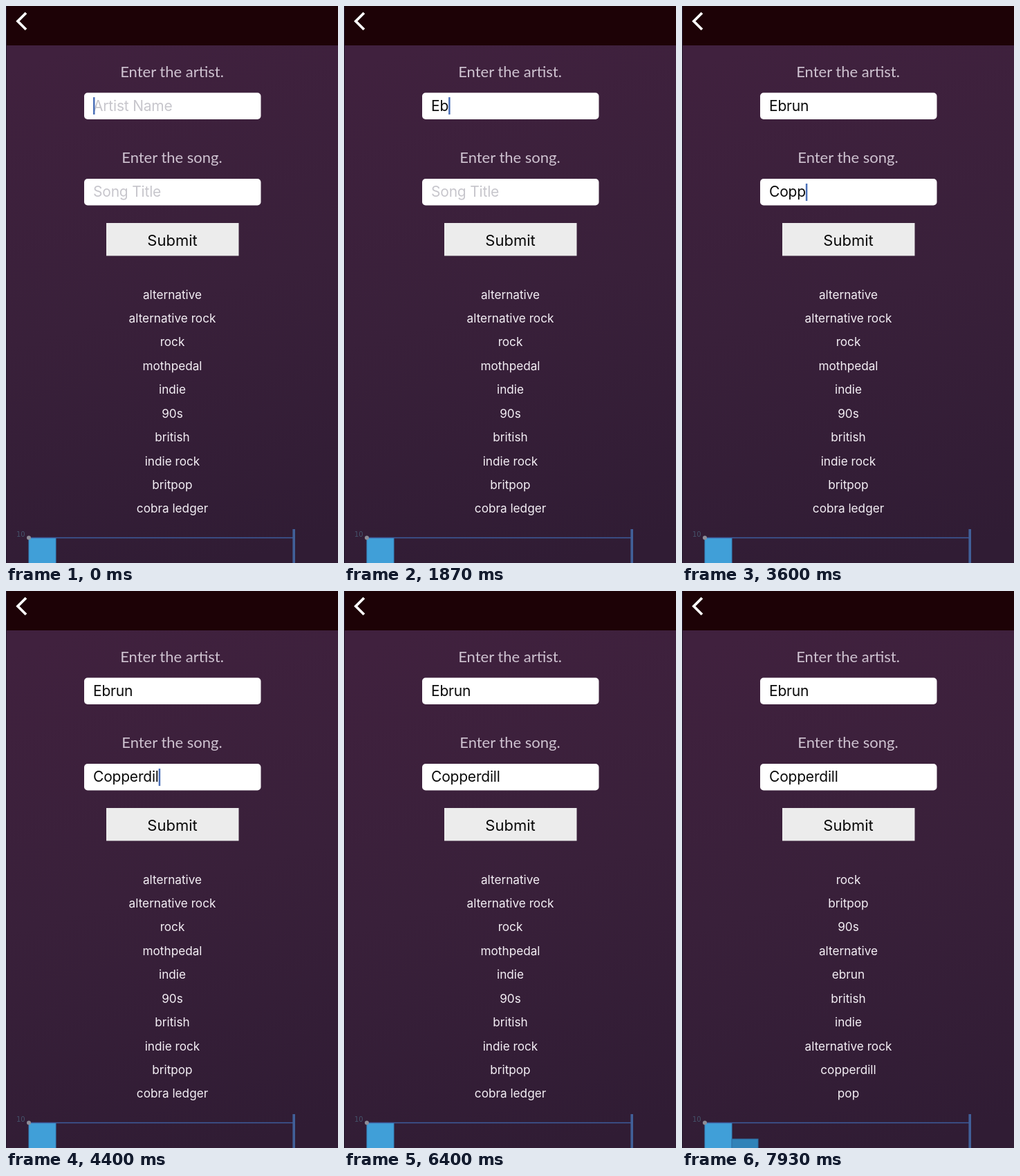
Write an HTML page that moves like this. It is 480x806 px and loops after 8000 ms.

```html
<!DOCTYPE html>
<html lang="en">
<head>
<meta charset="utf-8">
<title>Song tags</title>
<style>
  html, body { margin: 0; width: 100%; height: 100%; overflow: hidden; background: #36203a; }
  svg { display: block; width: 100%; height: 100%; }
  text { font-family: Inter, "Open Sans", sans-serif; }
  .label { font: 22px Lato, "Open Sans", sans-serif; fill: #cfc3d1; text-anchor: middle; }
  .field { font-size: 21px; letter-spacing: -.2px; fill: #0a0a0a; }
  .field.empty { fill: #c7c6cc; }
  .button { font-size: 22px; text-anchor: middle; fill: #080808; }
  .tags { font-size: 17.2px; text-anchor: middle; fill: #f4eff5; }
  .tick { font: 10px "DejaVu Sans", sans-serif; fill: #45536a; }
</style>
</head>
<body>
<svg viewBox="0 0 480 806" preserveAspectRatio="none">
  <defs>
    <linearGradient id="backdrop" gradientUnits="userSpaceOnUse" x1="120" y1="57" x2="330" y2="806">
      <stop offset="0" stop-color="#40213e"/>
      <stop offset=".5" stop-color="#39203a"/>
      <stop offset="1" stop-color="#301c34"/>
    </linearGradient>
  </defs>
  <rect width="480" height="806" fill="url(#backdrop)"/>
  <rect width="480" height="57" fill="#1d0206"/>
  <rect width="1" height="806" fill="#21172d"/>
  <path d="M29 10 17 22 29 34" fill="none" stroke="#fff" stroke-width="3.8"/>

  <text class="label" x="240" y="102.5">Enter the artist.</text>
  <rect x="113" y="125.5" width="255.5" height="38.5" rx="5" fill="#fff"/>
  <text class="field" id="artist" x="126" y="151.5"></text>

  <text class="label" x="240" y="227">Enter the song.</text>
  <rect x="113" y="250" width="255.5" height="38.5" rx="5" fill="#fff"/>
  <text class="field" id="song" x="126" y="276"></text>
  <rect id="caret" width="2.5" height="25" fill="#4b70b8"/>

  <rect x="145" y="314" width="191.5" height="47.5" fill="#ececec"/>
  <text class="button" x="240.5" y="346.5">Submit</text>

  <g class="tags" id="tags"></g>

  <text class="tick" x="15" y="767.5">10</text>
  <rect x="33" y="769.5" width="39" height="40" fill="#409fd8" stroke="#3584bd"/>
  <rect id="bar" x="72" y="793" width="38" height="40" fill="#3183b8" stroke="#2c6fa3"/>
  <path d="M33 769.5H416" stroke="#3d5c9d" stroke-width="1.4"/>
  <path d="M416.2 757V806" stroke="#416099" stroke-width="3.6"/>
  <circle cx="33" cy="769.5" r="3" fill="#8d8d97"/>
</svg>
<script>
  const LOOP = 8000, RESULTS_AT = 7270;
  const before = ["alternative", "alternative rock", "rock", "mothpedal", "indie",
                  "90s", "british", "indie rock", "britpop", "cobra ledger"];
  const after = ["rock", "britpop", "90s", "alternative", "ebrun",
                 "british", "indie", "alternative rock", "copperdill", "pop"];
  const fields = [
    { id: "artist", hint: "Artist Name", value: "Ebrun", start: 1500, step: 200, focus: [0, 2500], caretY: 132 },
    { id: "song", hint: "Song Title", value: "Copperdill", start: 2930, step: 170, focus: [2730, 4850], caretY: 257 }
  ];

  const get = id => document.getElementById(id);
  const clamp = v => Math.min(1, Math.max(0, v));
  const caret = get("caret"), bar = get("bar");

  const rows = before.map((_, i) => {
    const row = document.createElementNS("http://www.w3.org/2000/svg", "text");
    row.setAttribute("x", 240.5);
    row.setAttribute("y", 423.5 + i * 34.44);
    get("tags").append(row);
    return row;
  });

  function setText(node, text) {
    if (node.textContent !== text) node.textContent = text;
  }

  function drawField({ id, hint, value, start, step, focus, caretY }, t) {
    const node = get(id);
    const count = Math.min(value.length, Math.max(0, Math.floor((t - start) / step) + 1));
    setText(node, count ? value.slice(0, count) : hint);
    node.classList.toggle("empty", !count);

    if (t < focus[0] || t >= focus[1]) return;
    const typing = count > 0 && t < start + step * value.length + 300;
    const lit = typing || t % 1000 < 550;
    caret.setAttribute("x", 126 + (count ? node.getComputedTextLength() : 0));
    caret.setAttribute("y", caretY);
    caret.setAttribute("opacity", lit ? 1 : 0);
  }

  function draw(t) {
    caret.setAttribute("opacity", 0);
    fields.forEach(field => drawField(field, t));
    const tags = t < RESULTS_AT ? before : after;
    rows.forEach((row, i) => setText(row, tags[i]));
    const grow = 1 - (1 - clamp((t - RESULTS_AT) / 500)) ** 3;
    bar.setAttribute("y", 807 - 14 * grow);
  }

  const begin = performance.now();
  function tick() {
    draw((performance.now() - begin) % LOOP);
    requestAnimationFrame(tick);
  }
  tick();
</script>
</body>
</html>
```
